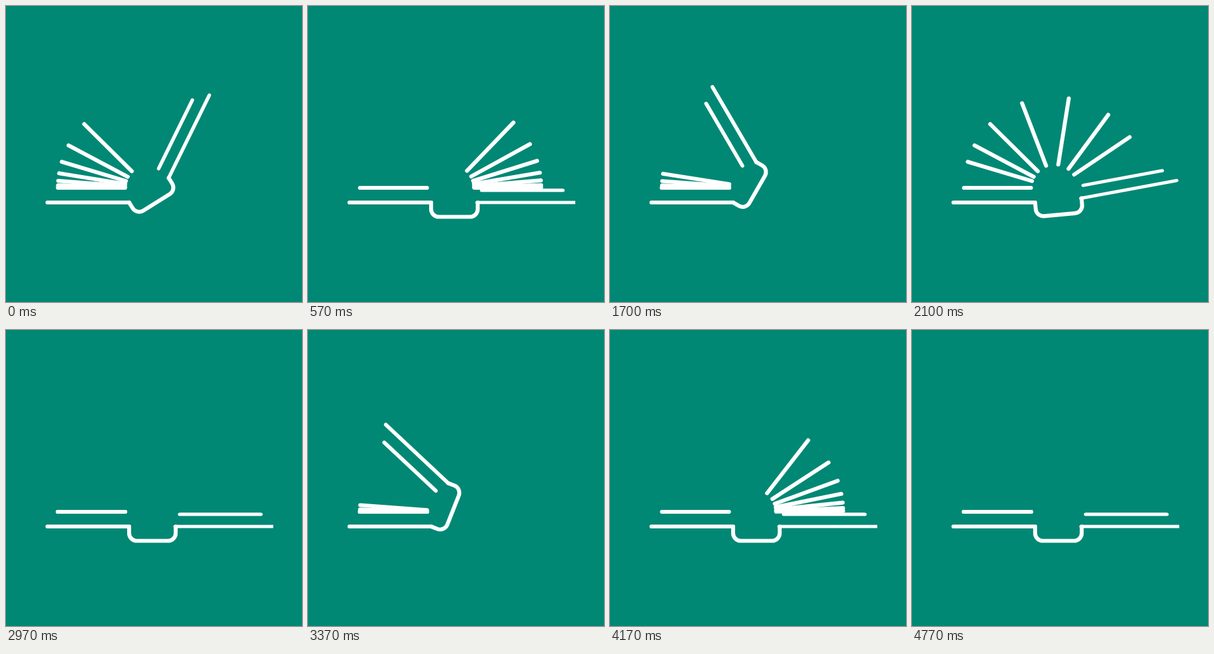
Recreate the animation shown at these times as an HTML page. Size 464 by 464 pixels, loop 4970 ms.

```html
<!DOCTYPE html>
<html lang="en">
<head>
<meta charset="utf-8">
<title>Book loader</title>
<style>
  html, body { margin: 0; height: 100%; overflow: hidden; background: #008875; }
  svg { display: block; fill: none; stroke: #fff; stroke-width: 6.2; stroke-linecap: round; }
</style>
</head>
<body>
<!-- The open cover runs past the right edge of the drawing and is cut there. -->
<svg width="419" height="464">
  <path d="M65 308H193M81.5 285H186.5"/>
  <g id="spine">
    <path d="M193 308v10.5a12 12 0 0 0 12 12h49a12 12 0 0 0 12-12v-10.5"/>
    <path id="cover" d="M0 0H128M6 -23H111.5"/>
  </g>
  <g id="pages"></g>
</svg>
<script>
const LOOP = 4970, COVER_TURN = 1000, PAGE_TURN = 1020;
const PAGES = 7, FIRST_PAGE = 180, STAGGER = 61;

// Each opening of the book: when it comes into view and when its motion began.
const cycles = [
  { cut: 0, start: -586 },
  { cut: 1300, start: 1270 },
  { cut: 3170, start: 3031 }
];

// How long each drawing is held, in ms.
const long = [70, 130, 70, 100, 100], short = [70, 130, 70, 130];
const holds = [
  100, ...long, 130, ...short, 200,
  ...long, 130, ...long, 130, ...long, 200,
  ...short, 130, ...long, 130, ...long, 200
];

const spine = document.getElementById('spine');
const cover = document.getElementById('cover');
const pageGroup = document.getElementById('pages');
const pages = Array.from({ length: PAGES }, () => {
  const page = document.createElementNS('http://www.w3.org/2000/svg', 'path');
  page.setAttribute('d', 'M81.5 285H186.5');
  return pageGroup.appendChild(page);
});

// Symmetric cubic-bezier(a, 0, 1 - a, 1), solved by bisection.
function ease(x, a) {
  if (x <= 0) return 0;
  if (x >= 1) return 1;
  let lo = 0, hi = 1, s;
  for (let i = 0; i < 24; i++) {
    s = (lo + hi) / 2;
    const bx = 3 * s * (1 - s) * ((1 - s) * a + s * (1 - a)) + s ** 3;
    if (bx < x) lo = s; else hi = s;
  }
  return s * s * (3 - 2 * s);
}

function heldTime(t) {
  let begin = 0;
  for (const hold of holds) {
    if (t < begin + hold) break;
    begin += hold;
  }
  return begin;
}

function draw(t) {
  const time = t - cycles.findLast(c => t >= c.cut).start;

  const open = ease(time / COVER_TURN, 0.42);
  const angle = -90 * (1 - open);
  spine.setAttribute('transform', `rotate(${angle} 193 308)`);
  cover.setAttribute('transform',
    `translate(266 308) rotate(${angle}) scale(${1 + 0.19 * open} ${1 - 0.17 * open})`);

  // A page that has finished turning goes back to the left stack.
  pages.forEach((page, i) => {
    const x = (time - FIRST_PAGE - i * STAGGER) / PAGE_TURN;
    const turn = x < 1 ? 180 * ease(x, 0.65) : 0;
    page.setAttribute('transform', `rotate(${turn} 223.5 285)`);
  });
}

const origin = performance.now();
function tick() {
  draw(heldTime((performance.now() - origin) % LOOP));
  requestAnimationFrame(tick);
}
tick();
</script>
</body>
</html>
```
